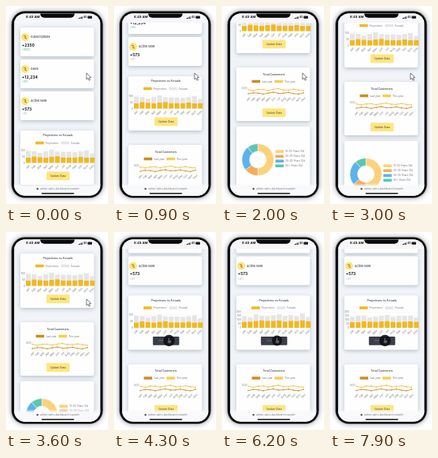
Animation, 128 px wide and 248 px high, one loop 8 s. Source, as an HTML page with a canvas:

```html
<!DOCTYPE html>
<html lang="en">
<head>
<meta charset="utf-8">
<title>Dashboard on a phone</title>
<style>
  html, body { margin: 0; width: 100%; height: 100%; overflow: hidden; background: #fff; }
  canvas { display: block; width: 128px; height: 248px; }
</style>
</head>
<body>
<canvas id="stage"></canvas>
<script>
const canvas = document.getElementById('stage');
const ctx = canvas.getContext('2d');
const ratio = window.devicePixelRatio || 1;
canvas.width = 128 * ratio;
canvas.height = 248 * ratio;

const LOOP = 8000, STEP = 100;
const INK = '#3d4148', GOLD = '#f0b823', AMBER = '#cc8c1e', PALE = '#fde580';
const MONTHS = 'Jan Feb Mar Apr May Jun Jul Aug Sep Oct Nov Dec'.split(' ');

// [time, value] keys, linear between neighbours
const SCROLL = [[100, 0], [500, 56], [800, 56], [900, 68], [1100, 95], [1300, 95], [2000, 165],
  [2200, 169], [2700, 169], [3000, 147], [3100, 144], [3400, 144], [4300, 76.5]];
const POINTER_X = [[3600, 101], [4200, 69]];
const POINTER_Y = [[3600, 84], [4200, 136]];
// [start, length] of each chart update
const UPDATES = [[5300, 900], [6400, 800], [7600, 900]];

const clamp = v => Math.max(0, Math.min(1, v));
const mix = (a, b, k) => a + (b - a) * k;
const easeOut = k => 1 - (1 - k) ** 4;

function track(keys, t) {
  if (t <= keys[0][0]) return keys[0][1];
  for (let i = 1; i < keys.length; i++) {
    const [t0, a] = keys[i - 1], [t1, b] = keys[i];
    if (t <= t1) return mix(a, b, (t - t0) / (t1 - t0));
  }
  return keys[keys.length - 1][1];
}

function random(seed) {
  return () => {
    seed = (seed * 16807) % 2147483647;
    return seed / 2147483647;
  };
}

function dataset(seed, max, low) {
  const next = random(seed);
  return MONTHS.map(() => {
    const base = mix(low, low + 2, next());
    return { base, total: Math.min(max, base + mix(5, 9, next())) };
  });
}
const SETS = [dataset(4211, 17.5, 6.5), dataset(977, 18.5, 7.5), dataset(6133, 18, 7.2), dataset(3089, 18, 7)];

function box(x, y, w, h, r, fill) {
  ctx.beginPath();
  ctx.roundRect(x, y, w, h, r);
  ctx.fillStyle = fill;
  ctx.fill();
}

function disc(x, y, r, fill) {
  ctx.beginPath();
  ctx.arc(x, y, r, 0, Math.PI * 2);
  ctx.fillStyle = fill;
  ctx.fill();
}

function text(value, x, y, size, color = INK, weight = 500, align = 'left') {
  ctx.font = `${weight} ${size}px Inter, sans-serif`;
  ctx.textAlign = align;
  ctx.textBaseline = 'middle';
  ctx.fillStyle = color;
  ctx.fillText(value, x, y);
}

function line(points, color, width) {
  ctx.beginPath();
  points.forEach(([x, y]) => ctx.lineTo(x, y));
  ctx.strokeStyle = color;
  ctx.lineWidth = width;
  ctx.stroke();
}

function card(y, h) {
  ctx.save();
  ctx.shadowColor = 'rgba(40,55,75,.28)';
  ctx.shadowBlur = 5 * ratio;
  ctx.shadowOffsetY = 1.5 * ratio;
  box(18, y, 92.5, h, 2, '#fefefe');
  ctx.restore();
}

function stat(y, label, value, change, changeColor) {
  card(y - 12, 36);
  disc(24, y, 5, '#fde57f');
  line([[22, y - 2], [25, y - 1], [23.5, y + 1], [26, y + 2]], '#a3781a', 1);
  text(label, 31, y + .2, 3.7);
  text(value, 20, y + 10.2, 4.9, '#17191e', 700);
  text(change, 20, y + 16.2, 2.8, changeColor, 400);
}

function legend(y, items) {
  for (const [x, color, label] of items) {
    box(x, y - 1.8, 10.5, 3.6, 0, color);
    text(label, x + 12.5, y + .2, 3.1, '#73777d', 400);
  }
}

function months(x, y, pitch) {
  MONTHS.forEach((name, i) => {
    ctx.save();
    ctx.translate(x + i * pitch, y);
    ctx.rotate(-.82);
    text(name, 0, 0, 3.5, '#73777d', 400, 'right');
    ctx.restore();
  });
}

function button(y, pressed) {
  const width = pressed ? 33 : 29;
  box(65.3 - width / 2, y - 5.4, width, 10.8, 1, pressed ? '#393d47' : PALE);
  text('Update Data', 65.3, y + .2, 3.3, pressed ? '#737780' : '#6b5c2c', 500, 'center');
}

function barsAt(t) {
  let bars = SETS[0];
  UPDATES.forEach(([start, length], n) => {
    const k = easeOut(clamp((t - start) / length));
    bars = bars.map((bar, i) => ({
      base: mix(bar.base, SETS[n + 1][i].base, k),
      total: mix(bar.total, SETS[n + 1][i].total, k)
    }));
  });
  return bars;
}

function projections(t, pressed) {
  card(156, 68);
  text('Projections vs Actuals', 65, 162.4, 3.5, INK, 500, 'center');
  legend(171.5, [[37, GOLD, 'Projections'], [69, '#e5e5e7', 'Actuals']]);
  const floor = 196.6, updated = t >= UPDATES[0][0];
  const ticks = updated ? [0, 50, 100, 150, 200] : [0, 50, 100];
  const gap = updated ? 4.9 : 8;
  ticks.forEach((tick, i) => {
    const y = floor - i * gap;
    line([[25, y], [112, y]], '#ebecee', .4);
    text(tick, 24, y, 3.1, '#73777d', 400, 'right');
  });
  barsAt(t).forEach((bar, i) => {
    const x = 25 + i * 7.3;
    box(x, floor - bar.total, 6, bar.total - bar.base, 0, '#e5e5e7');
    box(x, floor - bar.base, 6, bar.base, 0, GOLD);
  });
  months(29.5, 199.4, 7.3);
  button(212.8, pressed);
}

function customers() {
  card(242, 67);
  text('Total Customers', 65, 250.5, 3.5, INK, 500, 'center');
  legend(259.5, [[37.5, AMBER, 'Last year'], [66, '#f8cd50', 'This year']]);
  ['0', '2.00', '4.00'].forEach((tick, i) => {
    const y = 277.5 - i * 4.6;
    line([[32, y], [104, y]], '#ebecee', .4);
    if (i === 2) text(tick, 31.5, y, 3.2, '#73777d', 400, 'right');
  });
  const series = (level, phase, color) => {
    const points = MONTHS.map((_, i) =>
      [33 + i * 6.3, level + Math.sin(i * 1.9 + phase) * .9 + Math.sin(i * .8) * .4]);
    line(points, color, .8);
    points.forEach(([x, y]) => disc(x, y, .8, color));
  };
  series(274.2, 2, AMBER);
  series(269.8, 0, '#f4be35');
  months(35, 279.6, 6.3);
  button(298.6, false);
}

function ages() {
  card(316, 84);
  const parts = [
    [.5, '#fbd27b', '15-25 Years Old'], [.14, '#f4ac5c', '25-35 Years Old'],
    [.25, '#5bb3ea', '35-45 Years Old'], [.11, '#5cc6b0', '45+ Years Old']
  ];
  let angle = -Math.PI / 2;
  parts.forEach(([share, color, label], i) => {
    const end = angle + share * Math.PI * 2;
    ctx.beginPath();
    ctx.arc(45, 357.5, 20, angle, end);
    ctx.arc(45, 357.5, 10.5, end, angle, true);
    ctx.closePath();
    ctx.fillStyle = color;
    ctx.fill();
    ctx.strokeStyle = '#fff';
    ctx.lineWidth = .5;
    ctx.stroke();
    const y = 347.2 + i * 6;
    box(67, y - 1.8, 10.5, 3.6, 0, color);
    text(label, 79.5, y + .2, 3.2, '#73777d', 400);
    angle = end;
  });
}

function phone() {
  ctx.save();
  ctx.shadowColor = 'rgba(30,30,50,.45)';
  ctx.shadowBlur = 6 * ratio;
  box(6.6, 6.2, 115.2, 234.4, 17, '#77787f');
  ctx.restore();
  box(7.2, 6.8, 114, 233.2, 16.5, '#08090b');
}

function chrome() {
  box(10, 9, 109, 12.2, 0, '#f6f6f8');
  box(43, 6.8, 43, 8, [0, 0, 5, 5], '#08090b');
  text('8:49 AM', 25, 14.2, 4.1, '#17191e', 700);
  for (let i = 0; i < 4; i++) box(91 + i * 1.3, 15 - i * .6, .9, 1 + i * .6, 0, '#17191e');
  text('4G', 97, 14.3, 3.2, '#17191e', 700);
  box(102.5, 12.6, 5.5, 3.2, .8, '#17191e');

  const fade = ctx.createLinearGradient(0, 222, 0, 226);
  fade.addColorStop(0, 'rgba(248,249,250,0)');
  fade.addColorStop(1, '#f8f9fa');
  box(10, 222, 109, 18, 0, fade);
  disc(39.5, 229, 1.2, '#4a4d52');
  text('admin.sales-dashboard.example', 43, 229.2, 3.2, '#7b7f85', 400);
  box(44.5, 234, 41, 1.4, .7, '#1c1e21');
}

function arrow(x, y) {
  ctx.beginPath();
  [[0, 0], [0, 8], [1.9, 6.3], [3.2, 9.2], [4.5, 8.6], [3.3, 5.8], [5.8, 5.6]]
    .forEach(([dx, dy]) => ctx.lineTo(x + dx, y + dy));
  ctx.closePath();
  ctx.fillStyle = '#fff';
  ctx.fill();
  ctx.strokeStyle = '#45474c';
  ctx.lineWidth = .7;
  ctx.stroke();
}

function touch(x, y, t) {
  const press = UPDATES.some(([start]) => t >= start - 200 && t < start);
  disc(x, y, press ? 6.4 : 7.2, 'rgba(12,13,18,.88)');
  box(x - .8, y - 3.5, 1.4, 5, .7, '#5c6068');
  box(x - 1.6, y - .3, 4.2, 3.6, 1.2, '#5c6068');
}

function draw(t) {
  ctx.setTransform(ratio, 0, 0, ratio, 0, 0);
  ctx.fillStyle = '#fff';
  ctx.fillRect(0, 0, 128, 248);
  phone();

  const x = track(POINTER_X, t), y = track(POINTER_Y, t);
  const hovering = t >= 4200;
  ctx.save();
  ctx.beginPath();
  ctx.roundRect(10.2, 9.4, 108.2, 228, 13.5);
  ctx.clip();
  ctx.fillStyle = '#f0f4f8';
  ctx.fillRect(10, 8, 109, 232);
  ctx.save();
  ctx.translate(0, -track(SCROLL, t));
  stat(39, 'Subscriptions', '+2350', '+180.1%', '#35b878');
  stat(79, 'Sales', '+12,234', '+19%', '#35b878');
  stat(119, 'Active Now', '+573', '+201', '#a9adb3');
  projections(t, hovering);
  customers();
  ages();
  ctx.restore();
  chrome();
  ctx.restore();

  if (hovering) touch(x, y, t);
  else arrow(x, y);
}

function tick() {
  const now = performance.now() % LOOP;
  draw(Math.floor(now / STEP) * STEP);
  requestAnimationFrame(tick);
}
tick();
</script>
</body>
</html>
```
